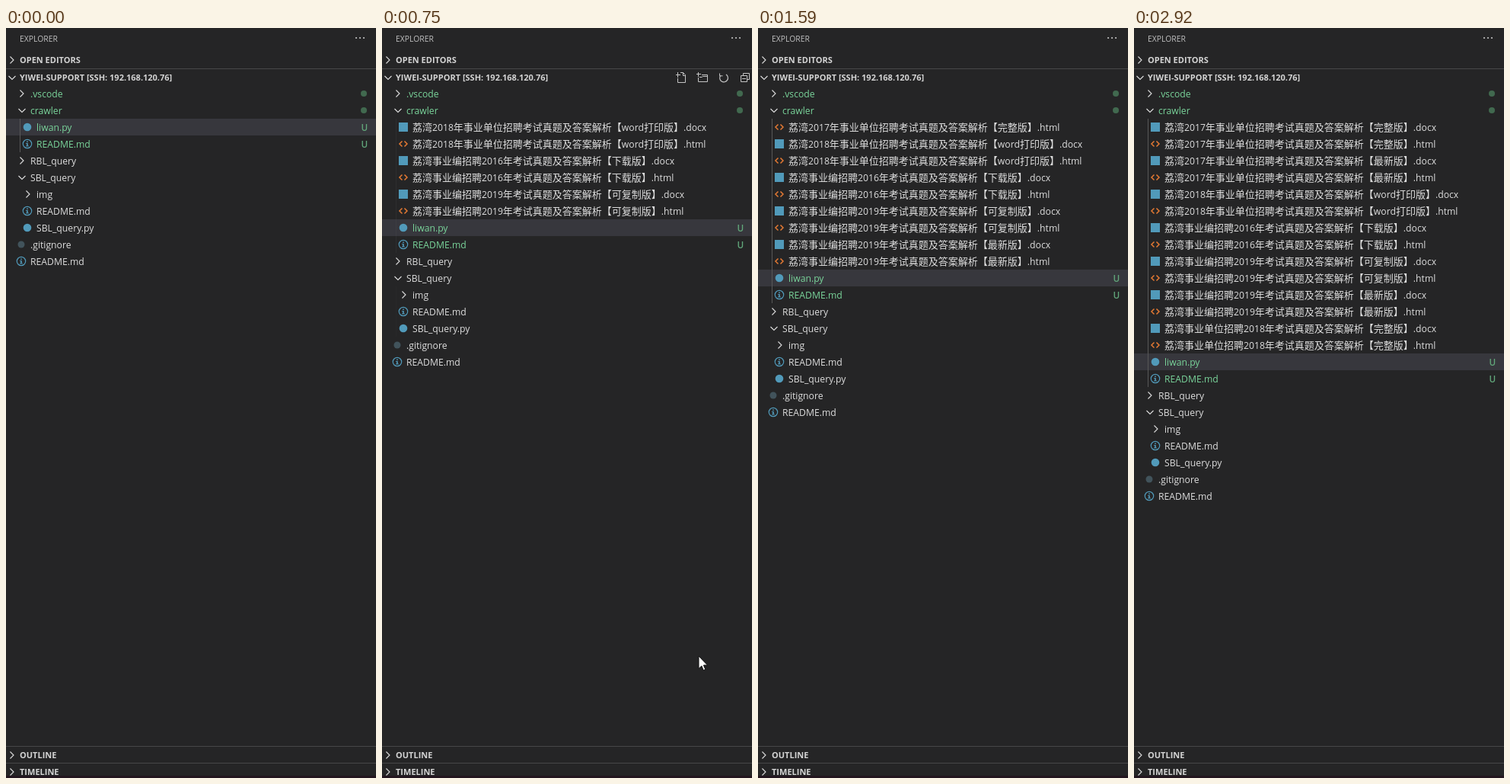
Recreate the animation shown at these times as an HTML page with a canvas. Size 486 by 984 pixels, loop 3210 ms.

```html
<!DOCTYPE html>
<html lang="en">
<head>
<meta charset="utf-8">
<title>Explorer</title>
<style>
html, body { margin: 0; width: 100%; height: 100%; overflow: hidden; background: #252526; }
canvas { display: block; }
</style>
</head>
<body>
<canvas id="stage" width="486" height="984"></canvas>
<script>
const ctx = document.getElementById('stage').getContext('2d');
const LOOP = 3210, ROW = 22, TREE_TOP = 75;
const TEXT = '#dedede', GREEN = '#7ad59b', BLUE = '#519aba', ORANGE = '#e37933', TOOL = '#c5c5c5';
const LATIN = '"Open Sans", sans-serif', CJK = '"Noto Sans CJK SC", "Noto Sans CJK", sans-serif';

// Stem, then the times at which its .docx and .html appear
const TAIL = '考试真题及答案解析';
const downloads = [
  ['荔湾2017年事业单位招聘' + TAIL + '【完整版】', 2130, 1510],
  ['荔湾2017年事业单位招聘' + TAIL + '【最新版】', 2130, 2130],
  ['荔湾2018年事业单位招聘' + TAIL + '【word打印版】', 200, 200],
  ['荔湾事业编招聘2016年' + TAIL + '【下载版】', 750, 750],
  ['荔湾事业编招聘2019年' + TAIL + '【可复制版】', 750, 200],
  ['荔湾事业编招聘2019年' + TAIL + '【最新版】', 1510, 1510],
  ['荔湾事业单位招聘2018年' + TAIL + '【完整版】', 2830, 2830],
];
// While the list refreshes, its indent guides are still faint
const refreshes = [[200, 270], [750, 820], [1510, 1590], [2130, 2210], [2830, 2920]];
// Pointer keys: start time, x, y, shape
const pointerKeys = [
  [0], [120, 418, 883, 'arrow'], [200, 416, 824, 'arrow'], [1210, 416, 838, 'arrow'],
  [1290, 415, 880, 'arrow'], [1370, 414, 930, 'arrow'], [1440, 414, 963, 'hand'], [1510],
];

function line(points, color, width = 1, close = false) {
  ctx.beginPath();
  points.forEach(([x, y]) => ctx.lineTo(x, y));
  if (close) ctx.closePath();
  ctx.strokeStyle = color;
  ctx.lineWidth = width;
  ctx.stroke();
}

function disc(x, y, r, color) {
  ctx.fillStyle = color;
  ctx.beginPath();
  ctx.arc(x, y, r, 0, 7);
  ctx.fill();
}

function rect(x, y, w, h, color) {
  ctx.fillStyle = color;
  ctx.fillRect(x, y, w, h);
}

// Latin and CJK runs use different fonts and sizes
function text(str, x, y, color = TEXT, size = 12.2, weight = 400) {
  ctx.fillStyle = color;
  for (const run of str.match(/[\u0000-\u2fff]+|[\u3000-\uffff]+/g)) {
    ctx.font = run[0] < '\u3000' ? `${weight} ${size}px ${LATIN}` : `13px ${CJK}`;
    ctx.fillText(run, x, y);
    x += ctx.measureText(run).width;
  }
}

function at(x, y, draw) {
  ctx.save();
  ctx.translate(x, y);
  draw();
  ctx.restore();
}

const icons = {
  closed: () => line([[-2.5, -4.5], [2, 0], [-2.5, 4.5]], TEXT, 1.1),
  open: () => line([[-4.5, -2], [0, 2.5], [4.5, -2]], TEXT, 1.1),
  py: () => disc(0, 0, 5.3, BLUE),
  git: () => disc(0, 0, 4.5, '#41535b'),
  docx: () => rect(-6, -6, 12, 12, BLUE),
  html() {
    line([[-1.5, -3.5], [-5, 0], [-1.5, 3.5]], ORANGE, 1.5);
    line([[1.5, -3.5], [5, 0], [1.5, 3.5]], ORANGE, 1.5);
  },
  info() {
    ctx.strokeStyle = BLUE;
    ctx.lineWidth = 1.2;
    ctx.beginPath();
    ctx.arc(0, 0, 5.7, 0, 7);
    ctx.stroke();
    rect(-0.8, -3.5, 1.6, 1.5, BLUE);
    rect(-0.8, -1, 1.6, 4, BLUE);
    rect(-1.8, -1, 1.5, 1, BLUE);
    rect(-1.8, 2.4, 3.6, 1, BLUE);
  },
};

function section(label, y, open, border = true) {
  if (border) rect(0, y - 12, 486, 1, '#474748');
  at(8, y, icons[open ? 'open' : 'closed']);
  text(label, 18, y + 4, '#d4d4d4', 11, 700);
}

function toolbar() {
  // New file
  line([[386, 61.5], [392, 61.5]], TOOL);
  line([[388.5, 58], [388.5, 65]], TOOL);
  line([[392, 58.5], [395.5, 58.5], [398.5, 61.5], [398.5, 71.5], [388.5, 71.5], [388.5, 66]], TOOL);
  line([[395.5, 58.5], [395.5, 62.5], [398.5, 62.5]], TOOL);
  // New folder
  line([[413, 60.5], [419, 60.5]], TOOL);
  line([[415.5, 58], [415.5, 64]], TOOL);
  line([[420, 61.5], [427.5, 61.5], [427.5, 70.5], [415.5, 70.5], [415.5, 65]], TOOL);
  line([[417, 64.5], [420, 64.5], [421.5, 63.5], [427.5, 63.5]], TOOL);
  // Refresh
  ctx.strokeStyle = TOOL;
  ctx.lineWidth = 1.2;
  ctx.beginPath();
  ctx.arc(449, 65.5, 5.4, -1, 3.75);
  ctx.stroke();
  line([[443.5, 59.5], [443.5, 62.8], [447.5, 62.8]], TOOL);
  // Collapse all
  line([[474.5, 62], [474.5, 59.5], [482.5, 59.5], [482.5, 67.5], [480, 67.5]], TOOL);
  line([[471.5, 62.5], [479.5, 62.5], [479.5, 70.5], [471.5, 70.5]], TOOL, 1, true);
  line([[473, 66.5], [478, 66.5]], TOOL);
}

function treeRows(t) {
  const child = (name, icon, more) => ({ name, icon, depth: 1, ...more });
  const folder = (name, open, more) => ({ name, icon: open ? 'open' : 'closed', folder: true, depth: 0, ...more });
  const files = downloads.flatMap(([stem, docx, html]) => [
    t >= docx && child(stem + '.docx', 'docx'),
    t >= html && child(stem + '.html', 'html'),
  ]).filter(Boolean);
  return [
    folder('.vscode', false, { color: GREEN, dot: true }),
    folder('crawler', true, { color: GREEN, dot: true }),
    ...files,
    child('liwan.py', 'py', { color: GREEN, untracked: true, selected: true }),
    child('README.md', 'info', { color: GREEN, untracked: true }),
    folder('RBL_query', false),
    folder('SBL_query', true),
    folder('img', false, { depth: 1 }),
    child('README.md', 'info'),
    child('SBL_query.py', 'py'),
    { name: '.gitignore', icon: 'git', depth: 0 },
    { name: 'README.md', icon: 'info', depth: 0 },
  ];
}

function tree(t, hovered) {
  const rows = treeRows(t);
  rows.forEach((row, i) => {
    const top = TREE_TOP + i * ROW, mid = top + 11;
    if (row.selected) rect(0, top, 486, ROW, '#37373d');
    const iconX = (row.folder ? 21 : 20) + row.depth * 8;
    at(iconX, mid, icons[row.icon]);
    text(row.name, 32 + row.depth * 8, top + 16, row.color);
    if (row.dot) disc(470, mid, 4, '#41694f');
    if (row.untracked) text('U', 466.5, top + 16, '#62a87b', 11.7, 600);
  });

  const fading = refreshes.some(([from, to]) => t >= from && t < to);
  const indexOf = name => rows.findIndex(row => row.name === name);
  const guide = (folder, next, color) => {
    const first = indexOf(folder) + 1;
    rect(18, TREE_TOP + first * ROW, 1, (indexOf(next) - first) * ROW, color);
  };
  ctx.globalAlpha = fading ? 0.2 : 1;
  guide('crawler', 'RBL_query', '#585858');
  if (hovered) guide('SBL_query', '.gitignore', '#3a3a3a');
  ctx.globalAlpha = 1;
}

const pointerShapes = {
  arrow: 'M0 0V16.5L3.8 13L6.2 18.6L8.8 17.5L6.4 12H11.5Z',
  hand: 'M-2 2Q-2 0 0 0Q2 0 2 2V7Q4 6 5 8Q7 7 8 9Q10 9 10 11V15L8 19V22H-2V19L-6 13Q-7 10 -4.5 10.5L-2 13Z',
};

function pointer([, x, y, shape]) {
  if (!shape) return;
  at(x, y, () => {
    const path = new Path2D(pointerShapes[shape]);
    ctx.fillStyle = '#fff';
    ctx.strokeStyle = '#111';
    ctx.lineWidth = 1;
    ctx.fill(path);
    ctx.stroke(path);
    if (shape === 'hand') [2, 5, 8].forEach(fx => line([[fx, 8], [fx, 12]], '#333', 0.7));
  });
}

function render(t) {
  const key = pointerKeys.findLast(([start]) => t >= start);
  const hovered = key[3] === 'arrow';
  rect(0, 0, 486, 984, '#252526');
  text('EXPLORER', 18, 18, '#c0c0c0', 10.4);
  [460, 465, 470].forEach(x => disc(x, 13, 1.1, TOOL));
  section('OPEN EDITORS', 42, false, false);
  section('YIWEI-SUPPORT [SSH: 192.168.120.76]', 65, true);
  if (hovered) toolbar();
  tree(t, hovered);
  section('OUTLINE', 954, false);
  section('TIMELINE', 976, false);
  rect(0, 981, 486, 3, '#23161f');
  pointer(key);
}

const start = performance.now();
function tick() {
  render((performance.now() - start) % LOOP);
  requestAnimationFrame(tick);
}
tick();
</script>
</body>
</html>
```
